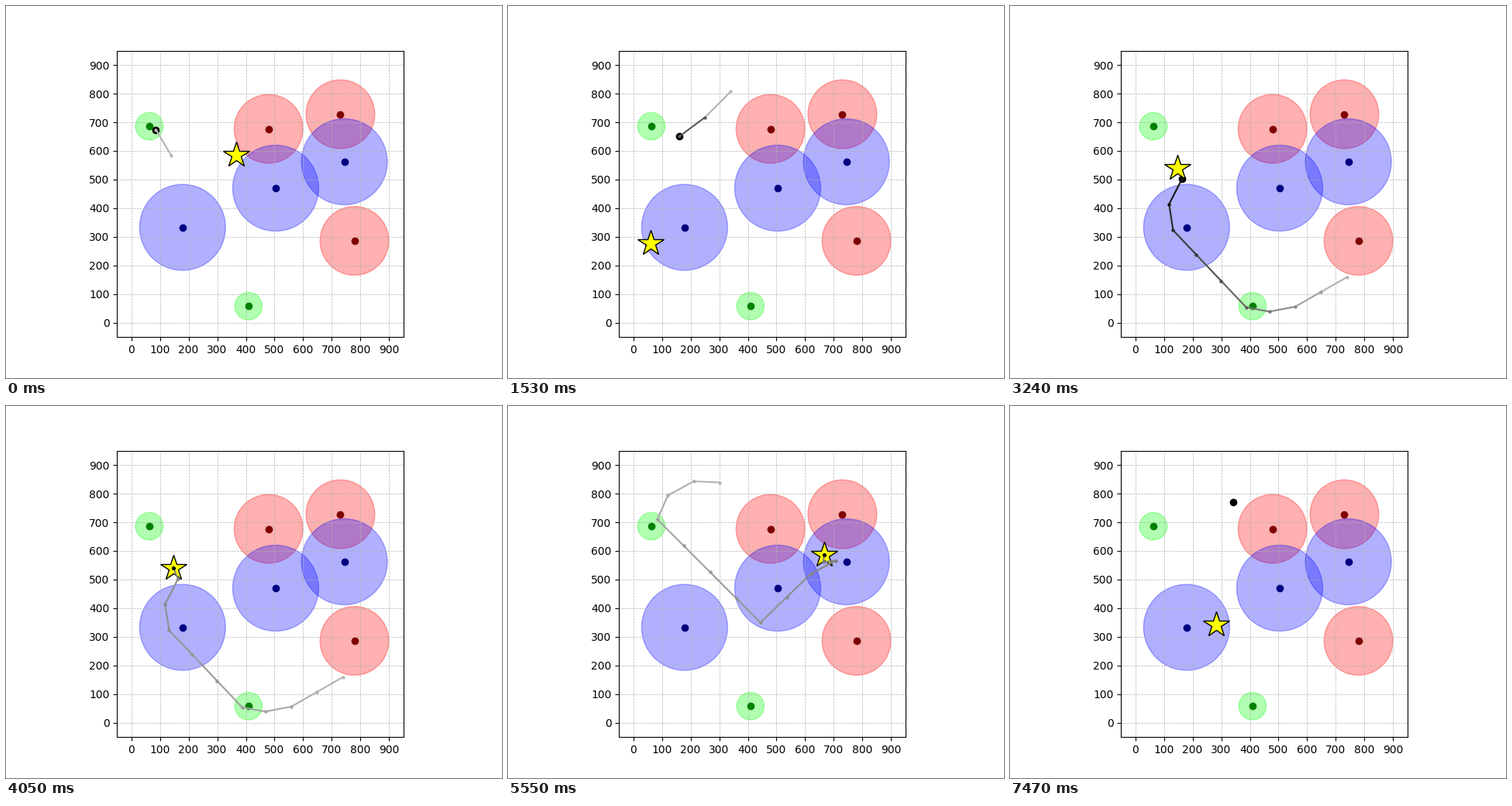
A matplotlib script that plays this animation: 640 px wide and 480 px high, repeating every 7.5 s.

```python
import numpy as np
import matplotlib.pyplot as plt
from matplotlib.animation import FuncAnimation
from matplotlib.patches import Circle

FRAMES, INTERVAL = 250, 30
STEPS = 50   # steps per episode
SPEED = 92   # longest move along either axis

# zones: fill, centre colour, radius, centres
ZONES = [
    ("red", "maroon", 120, [(479, 677), (730, 728), (779, 286)]),
    ("lime", "green", 48, [(63, 686), (409, 58)]),
    ("blue", "navy", 150, [(179, 333), (504, 470), (744, 562)]),
]

# turning points of each walk; the last one is the goal
WALKS = [
    [(139, 585), (86, 674), (366, 586)],
    [(340, 807), (250, 717), (160, 650), (70, 658), (160, 568), (60, 278)],
    [(740, 160), (558, 56), (468, 39), (387, 54), (132, 323), (118, 414),
     (163, 502), (147, 541)],
    [(301, 839), (211, 843), (121, 794), (84, 710), (444, 350), (620, 520),
     (707, 566), (663, 561), (667, 586)],
    [(251, 820), (161, 732), (82, 675), (158, 587), (123, 465)],
    [(342, 770), (283, 344)],
]


def walk(keys):
    """Step from key to key at limited speed, then rest on the last one."""
    pos = np.array(keys[0], float)
    points = [pos]
    for key in keys[1:]:
        while np.any(pos != key):
            move = np.array(key, float) - pos
            reach = np.abs(move).max()
            pos = np.array(key, float) if reach <= SPEED else pos + move * SPEED / reach
            points.append(pos)
    points += [pos] * (STEPS - len(points))
    return np.array(points)


PATHS = [walk(keys) for keys in WALKS]

fig, ax = plt.subplots(figsize=(6.4, 4.8), dpi=100)
ax.set_aspect("equal")
ax.set_xlim(-50, 950)
ax.set_ylim(-50, 950)
ax.set_xticks(range(0, 1000, 100))
ax.set_yticks(range(0, 1000, 100))
ax.grid(linestyle="--", linewidth=0.5)

for fill, core, radius, centres in ZONES:
    for centre in centres:
        ax.add_patch(Circle(centre, radius, color=fill, alpha=0.31))
        ax.plot(*centre, "o", color=core)

agent, = ax.plot([], [], "ko")
star, = ax.plot([], [], "*", ms=25, color="yellow", mec="black")
trail = [ax.plot([], [], "o-", lw=1.5, ms=2)[0] for _ in range(STEPS - 1)]


def update(frame):
    episode, step = divmod(frame + 1, STEPS)
    x, y = PATHS[episode].T
    greys = np.linspace(0.7, 0, step + 1)
    star.set_data([x[-1]], [y[-1]])
    agent.set_data([x[step]], [y[step]])
    for i, line in enumerate(trail):
        line.set_visible(i < step)
        if i < step:
            line.set_data(x[i:i + 2], y[i:i + 2])
            line.set_color(str(greys[i]))
    return [agent, star, *trail]


anim = FuncAnimation(fig, update, frames=FRAMES, interval=INTERVAL,
                     repeat=True, repeat_delay=0)
plt.show()
```
